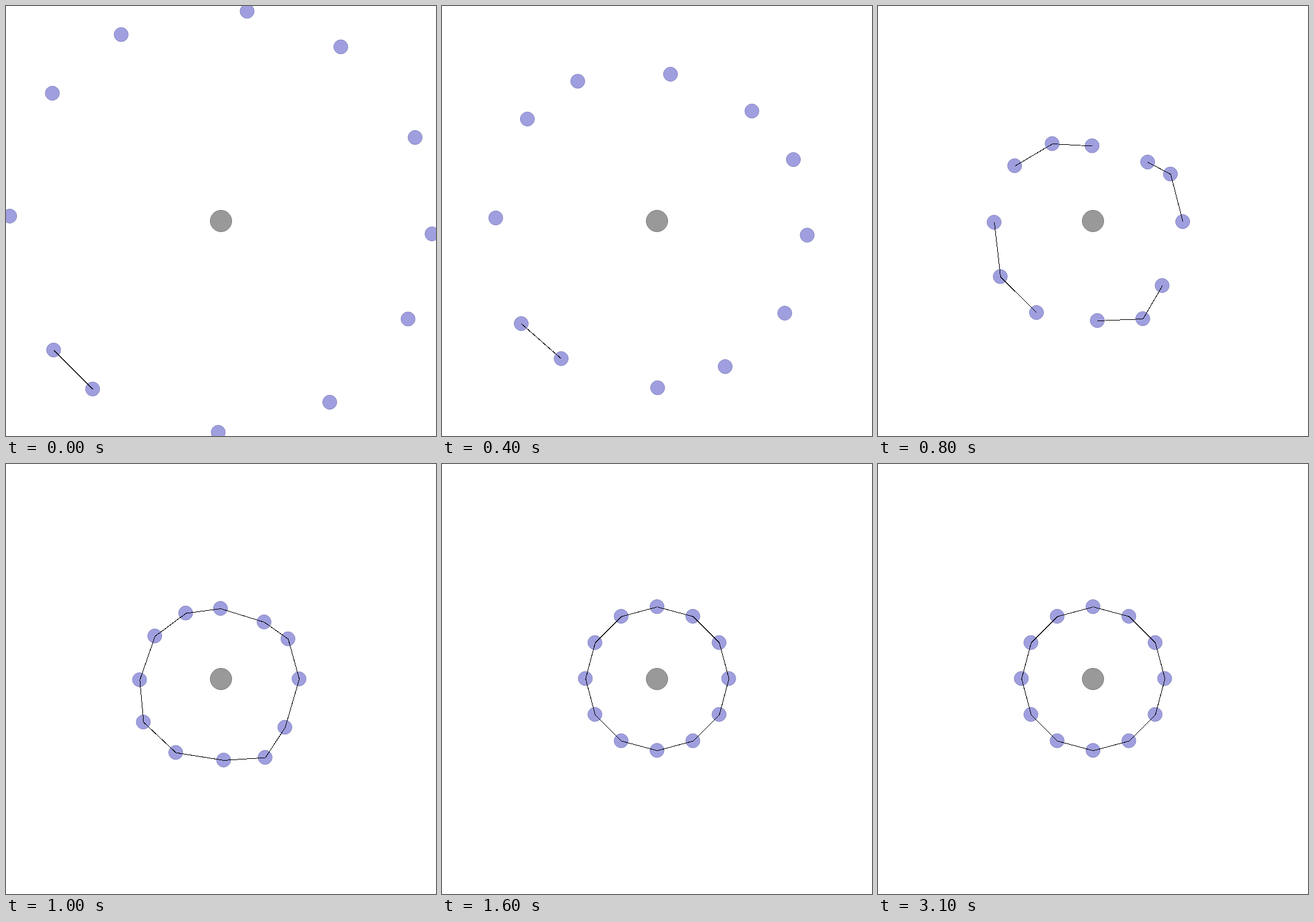
Animation of 700x700 px, one loop 4.1 s. Source, as an HTML page:

```html
<!DOCTYPE html>
<html lang="en">
<head>
<meta charset="utf-8">
<title>Ring forming</title>
<style>
  html, body { margin: 0; width: 100%; height: 100%; overflow: hidden; background: #fff; }
  svg { display: block; }
  .ball { fill: #9f9fdf; stroke: #8888c4; }
  .core { fill: #999; stroke: #808080; }
  line { stroke: #000; shape-rendering: crispEdges; }
</style>
</head>
<body>
<svg width="700" height="700" viewBox="0 0 700 700"></svg>
<script>
const svg = document.querySelector('svg');
const COUNT = 12, LOOP = 4100, STEP = 100, LAST_STEP = 31, STEPS_PER_POSE = 4;
const LINK_RANGE = 91;

// x, y of every ball, clockwise, one pose per 400 ms
const poses = [
  [187.5,46.5, 392.5,8.5, 545,66.5, 666,214, 693.5,371, 654.5,509.5,
   527,645, 345.5,694, 141,623.5, 77.5,560, 6,342, 75.5,142],
  [221,122.5, 372,111, 504.5,171, 572,250, 594.5,373, 558,500,
   461,587, 351,621.5, 194,574, 129,517, 87.5,345, 139,184],
  [283.5,224, 348.5,227.5, 439,254, 476,273.5, 496,351, 462.5,455,
   431,509, 357,512, 258,499, 199,440.5, 189,352, 222.5,260],
  [295,250, 351.5,232, 409.5,253, 452.5,292, 469,350.5, 454.5,410,
   416.5,457.5, 351.5,465.5, 286.5,451, 238.5,409, 233,350, 252,290.5],
];
// settled ring
poses.push(poses[0].map((_, k) => {
  const angle = ((k >> 1) - 4) * Math.PI / 6;
  return k % 2 ? 349.2 + 117 * Math.sin(angle) : 350 + 116.7 * Math.cos(angle);
}));

// fast pull inwards, then heavy damping
function speed(i, k) {
  const change = (a, b) => poses[b][k] - poses[a][k];
  return [() => 0.8 * change(0, 1), () => 0.6 * change(0, 2), () => 0.35 * change(1, 3)][i]?.() ?? 0;
}

function coordinate(time, k) {
  const i = Math.min(Math.floor(time), poses.length - 2);
  const u = Math.min(time - i, 1), v = 1 - u;
  return poses[i][k] * v * v * (1 + 2 * u) + poses[i + 1][k] * u * u * (3 - 2 * u)
    + speed(i, k) * u * v * v - speed(i + 1, k) * u * u * v;
}

function add(tag, attrs = {}) {
  const el = svg.appendChild(document.createElementNS('http://www.w3.org/2000/svg', tag));
  set(el, attrs);
  return el;
}

function set(el, attrs) {
  for (const name in attrs) el.setAttribute(name, attrs[name]);
}

add('circle', { class: 'core', cx: 350, cy: 350, r: 17.5 });
const balls = Array.from({ length: COUNT }, () => add('circle', { class: 'ball', r: 11.5 }));
const links = Array.from({ length: COUNT }, () => add('line'));

function draw() {
  const step = Math.min(Math.floor(performance.now() % LOOP / STEP), LAST_STEP);
  const time = step / STEPS_PER_POSE;
  const points = balls.map((_, i) => [coordinate(time, 2 * i), coordinate(time, 2 * i + 1)]);
  points.forEach(([x, y], i) => {
    const [nx, ny] = points[(i + 1) % COUNT];
    const linked = Math.hypot(nx - x, ny - y) < LINK_RANGE;
    set(balls[i], { cx: x, cy: y });
    set(links[i], {
      x1: x + 0.5, y1: y + 0.5, x2: nx + 0.5, y2: ny + 0.5,
      visibility: linked ? 'visible' : 'hidden',
    });
  });
  requestAnimationFrame(draw);
}
draw();
</script>
</body>
</html>
```
